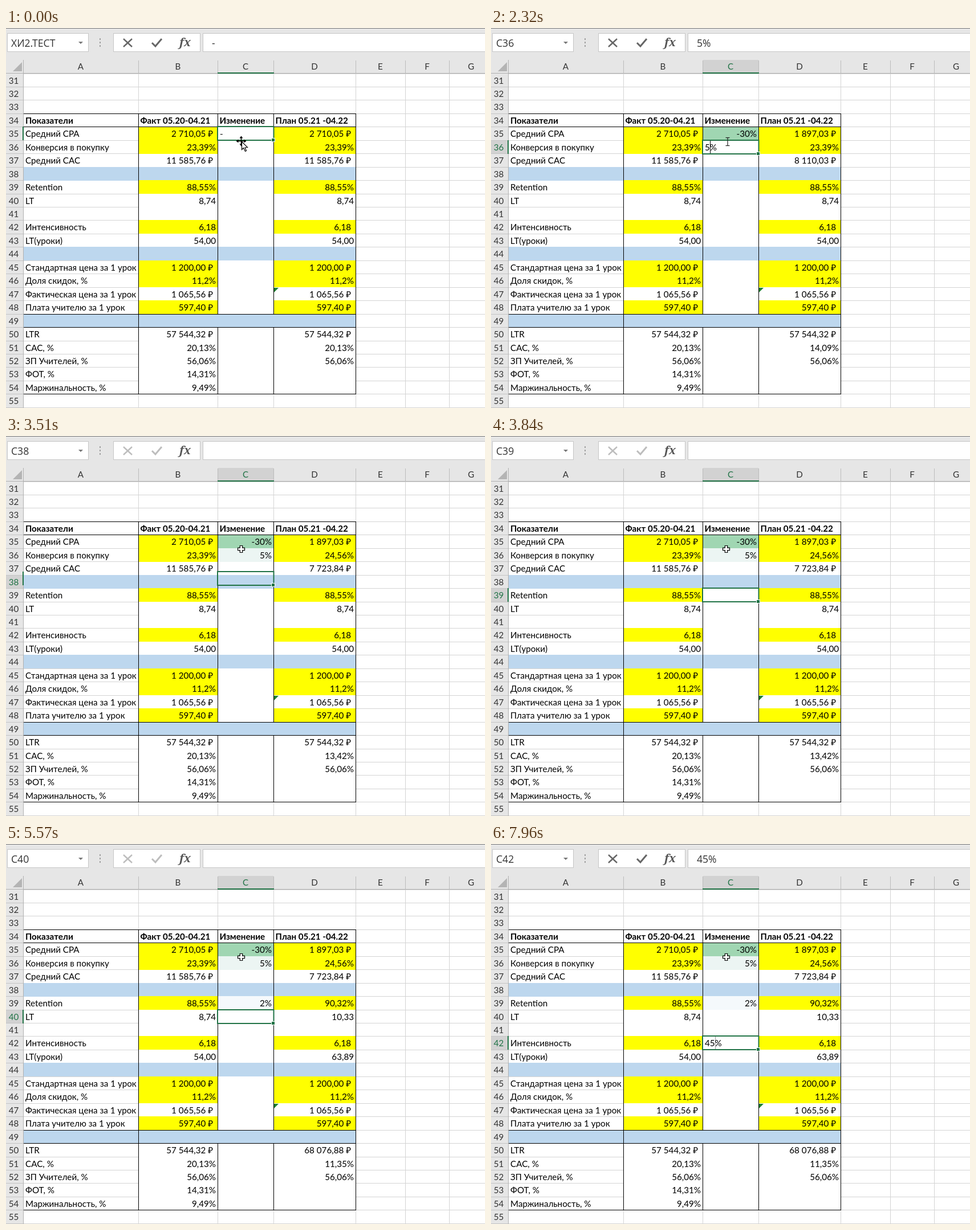
Write an HTML page with a canvas that moves like this. It is 840x667 px and loops after 8000 ms.

```html
<!DOCTYPE html>
<html lang="ru">
<head>
<meta charset="utf-8">
<style>
  html, body { margin: 0; width: 100%; height: 100%; overflow: hidden; background: #fff; }
  canvas { display: block; }
</style>
</head>
<body>
<canvas id="stage" width="840" height="667"></canvas>
<script>
const ctx = document.getElementById('stage').getContext('2d');
const LOOP = 8000;
const GREEN = '#217346', GRID = '#d4d4d4', HEAD = '#e6e6e6', YELLOW = '#ffff00', BLUE = '#bdd7ee';
const CELL = '15.2px Lato, Carlito, sans-serif', BOLD = 'bold ' + CELL;
const BAR = '17.6px "Open Sans", "Noto Sans", sans-serif';
const colX = [30, 232, 371, 469, 613, 700, 777, 854];
const rowY = r => Math.round(79.5 + 23.45 * (r - 31));

// row: [label, fact, plan, highlighted]
const rows = {
  35: ['Средний CPA', '2 710,05 ₽', '2 710,05 ₽', 1],
  36: ['Конверсия в покупку', '23,39%', '23,39%', 1],
  37: ['Средний CAC', '11 585,76 ₽', '11 585,76 ₽'],
  39: ['Retention', '88,55%', '88,55%', 1],
  40: ['LT', '8,74', '8,74'],
  42: ['Интенсивность', '6,18', '6,18', 1],
  43: ['LT(уроки)', '54,00', '54,00'],
  45: ['Стандартная цена за 1 урок', '1 200,00 ₽', '1 200,00 ₽', 1],
  46: ['Доля скидок, %', '11,2%', '11,2%', 1],
  47: ['Фактическая цена за 1 урок', '1 065,56 ₽', '1 065,56 ₽'],
  48: ['Плата учителю за 1 урок', '597,40 ₽', '597,40 ₽', 1],
  50: ['LTR', '57 544,32 ₽', '57 544,32 ₽'],
  51: ['CAC, %', '20,13%', '20,13%'],
  52: ['ЗП Учителей, %', '56,06%', '56,06%'],
  53: ['ФОТ, %', '14,31%', ''],
  54: ['Маржинальность, %', '9,49%', '']
};

// each commit recalculates part of the plan column
const commits = [
  { at: 1440, row: 35, text: '-30%', fill: '#a0d6b2', plan: { 35: '1 897,03 ₽', 37: '8 110,03 ₽', 51: '14,09%' } },
  { at: 2990, row: 36, text: '5%', fill: '#ecf5f3', plan: { 36: '24,56%', 37: '7 723,84 ₽', 51: '13,42%' } },
  { at: 5390, row: 39, text: '2%', fill: '#f5f9fc', plan: { 39: '90,32%', 40: '10,33', 43: '63,89', 50: '68 076,88 ₽', 51: '11,35%' } }
];
// [start, end, steps, row]
const moves = [[0, 0, 1, 35], [1440, 1500, 2, 36], [2990, 3200, 5, 37], [3510, 3570, 2, 38],
  [3720, 3840, 3, 39], [5390, 5570, 4, 40], [5780, 5840, 2, 41], [6090, 6150, 2, 42]];
const typing = [[0, '-'], [30, '-3%'], [270, '-30%'], [1440, ''], [2320, '5%'], [2990, ''],
  [4930, '2%'], [5390, ''], [7080, '4%'], [7230, '45%']];
const blink = [[0, 0], [30, 1], [510, .5], [540, 0], [750, .5], [810, 1], [960, .5], [1020, 0],
  [1200, .4], [1245, .7], [1290, 1], [2510, .5], [2570, 0], [2760, .5], [2810, 1],
  [5150, 0], [5390, 1], [7500, 0], [7740, 1], [7960, .4]];
const lastAt = (list, t) => list.filter(item => item[0] <= t).pop();

function rect(x, y, w, h, color) {
  ctx.fillStyle = color;
  ctx.fillRect(x, y, w, h);
}
const hLine = (x1, x2, y, color) => rect(x1, y, x2 - x1 + 1, 1, color);
const vLine = (x, y1, y2, color) => rect(x, y1, 1, y2 - y1 + 1, color);

function text(str, x, y, align = 'left', font = CELL, color = '#000') {
  ctx.font = font;
  ctx.textAlign = align;
  ctx.fillStyle = color;
  ctx.fillText(str, x, y);
}
function path(points, color, width, close) {
  ctx.beginPath();
  points.forEach(([x, y]) => ctx.lineTo(x, y));
  if (close) ctx.closePath();
  ctx.strokeStyle = color;
  ctx.lineWidth = width;
  ctx.stroke();
}
function shape(points, fill, stroke) {
  ctx.beginPath();
  points.forEach(([x, y]) => ctx.lineTo(x, y));
  ctx.closePath();
  ctx.fillStyle = fill;
  ctx.fill();
  if (stroke) path(points, stroke, 1.2, true);
}
function box(x, y, w, h) {
  rect(x, y, w, h, '#c6c6c6');
  rect(x + 1, y + 1, w - 2, h - 2, '#fff');
}

function drawBar(name, value) {
  rect(0, 0, 840, 55, HEAD);
  hLine(0, 840, 0, '#777');
  box(2, 9, 143, 33);
  box(188, 9, 153, 33);
  box(345, 9, 500, 33);
  text(name, 9, 33, 'left', BAR, '#333');
  shape([[127, 24], [135, 24], [131, 28]], '#777');
  for (const y of [18, 24, 30]) rect(164, y, 2, 3, '#a0a0a0');
  const tone = value ? '#666' : '#bdbdbd';
  path([[206, 19], [221, 33]], tone, 2.4);
  path([[221, 19], [206, 33]], tone, 2.4);
  path([[256, 26], [262, 32], [273, 19]], tone, 3);
  text('fx', 314, 32, 'center', 'italic bold 20px "Noto Serif", "Liberation Serif", serif', '#555');
  text(value, 361, 33, 'left', BAR, '#333');
}

function drawHeaders(row, active, selY) {
  rect(0, 55, 840, 25, HEAD);
  rect(0, 80, 30, 587, HEAD);
  shape([[28, 60], [28, 76], [12, 76]], '#b4b4b4');
  if (active) {
    rect(372, 56, 97, 23, '#d2d2d2');
    rect(0, rowY(row) + 1, 30, 23, '#d2d2d2');
  }
  hLine(0, 840, 79, '#b0b0b0');
  vLine(30, 56, 667, '#b0b0b0');
  for (let i = 0; i < 7; i++) {
    if (i) vLine(colX[i], 57, 78, '#bcbcbc');
    const on = active && i === 2;
    text('ABCDEFG'[i], (colX[i] + colX[i + 1]) / 2, 73, 'center', CELL, on ? GREEN : '#333');
  }
  for (let r = 31; r <= 55; r++) {
    hLine(0, 29, rowY(r + 1), '#c4c4c4');
    text(r, 13.5, rowY(r) + 18, 'center', CELL, active && r === row ? GREEN : '#333');
  }
  rect(371, 78, 99, 2, GREEN);
  rect(29, selY, 2, 24, GREEN);
}

function drawSheet(plan, done) {
  rect(0, 0, 840, 667, '#fff');
  for (let r = 31; r <= 56; r++) hLine(30, 840, rowY(r), GRID);
  for (const x of colX) vLine(x, 80, 667, GRID);
  rect(232, 150, 381, 492, '#fff');

  for (const r of [38, 44, 49]) rect(31, rowY(r), 582, 24, BLUE);
  for (const r in rows) {
    if (!rows[r][3]) continue;
    rect(232, rowY(r), 140, 24, YELLOW);
    rect(469, rowY(r), 144, 24, YELLOW);
  }
  for (const c of done) {
    rect(372, rowY(c.row), 97, 24, c.fill);
    text(c.text, 466, rowY(c.row) + 18, 'right');
  }

  ['Показатели', 'Факт 05.20-04.21', 'Изменение', 'План 05.21 -04.22'].forEach((title, i) =>
    text(title, colX[i] + (i ? 3.5 : 4), rowY(34) + 18, 'left', BOLD));
  for (const r in rows) {
    const [label, fact, target] = rows[r], y = rowY(r) + 18;
    ctx.save();
    ctx.beginPath();
    ctx.rect(31, y - 18, 201, 24);
    ctx.clip();
    text(label, 34, y);
    ctx.restore();
    const value = plan[r] || target;
    text(fact, fact.endsWith('₽') ? 363 : 368, y, 'right');
    text(value, value.endsWith('₽') || r === '42' ? 605 : 610, y, 'right');
  }

  for (const r of [34, 35, 49, 50, 55]) hLine(30, 613, rowY(r), '#000');
  for (const x of [232, 613]) vLine(x, 150, 642, '#000');
  for (const x of [371, 469]) {
    vLine(x, 150, rowY(49), '#000');
    vLine(x, rowY(50), 642, '#000');
  }
  const y = rowY(47);
  shape([[470, y + 1], [478, y + 1], [470, y + 9]], '#1a7f2e');
}

function drawSelection(y, value, caret) {
  if (value) {
    rect(372, y + 1, 97, 23, '#fff');
    text(value, 375, y + 18);
    const x = 375 + ctx.measureText(value.replace('%', '')).width;
    ctx.globalAlpha = caret;
    vLine(Math.round(x), y + 1, y + 22, '#000');
    ctx.globalAlpha = 1;
  }
  ctx.strokeStyle = GREEN;
  ctx.lineWidth = 2;
  ctx.strokeRect(371, y, 98.5, 24);
  rect(465, y + 20, 7, 7, '#fff');
  rect(466, y + 21, 5, 5, GREEN);
}

function drawPointer(kind) {
  ctx.save();
  ctx.translate(412.5, 198.5);
  if (kind === 'move') {
    path([[-7, 0], [7, 0]], '#000', 1.5);
    path([[0, -7], [0, 7]], '#000', 1.5);
    for (let i = 0; i < 4; i++) {
      shape([[-3, -5], [0, -9], [3, -5]], '#000');
      ctx.rotate(Math.PI / 2);
    }
    shape([[1, 1], [1, 15], [4, 12], [7, 18], [9, 17], [6.5, 11.5], [11, 11]], '#fff', '#000');
  } else if (kind === 'beam') {
    path([[-1, -6], [6, -6]], '#222', 1.2);
    path([[-1, 8], [6, 8]], '#222', 1.2);
    path([[2.5, -6], [2.5, 8]], '#222', 1.2);
  } else {
    const a = 2.2, b = 6;
    shape([[-a, -b], [a, -b], [a, -a], [b, -a], [b, a], [a, a],
      [a, b], [-a, b], [-a, a], [-b, a], [-b, -a], [-a, -a]], '#fff', '#000');
  }
  ctx.restore();
}

function slide(t) {
  const [start, end, steps, row] = lastAt(moves, t);
  if (t >= end) return { row, y: rowY(row) };
  const step = Math.floor((t - start) / (end - start) * (steps - 1)) + 1;
  const left = (1 - step / steps) ** 2;
  return { row, y: Math.round(rowY(row) - left * (rowY(row) - rowY(row - 1))) };
}

function draw(t) {
  const { row, y } = slide(t);
  const value = lastAt(typing, t)[1];
  const done = commits.filter(c => c.at <= t);
  const plan = Object.assign({}, ...done.map(c => c.plan));
  const active = row > 35;
  drawSheet(plan, done);
  drawBar(active ? 'C' + row : 'ХИ2.ТЕСТ', value);
  drawHeaders(row, active, y);
  drawSelection(y, value, lastAt(blink, t)[1]);
  drawPointer(!active ? 'move' : value && row === 36 ? 'beam' : 'plus');
}

function tick() {
  draw(performance.now() % LOOP);
  requestAnimationFrame(tick);
}
tick();
</script>
</body>
</html>
```
